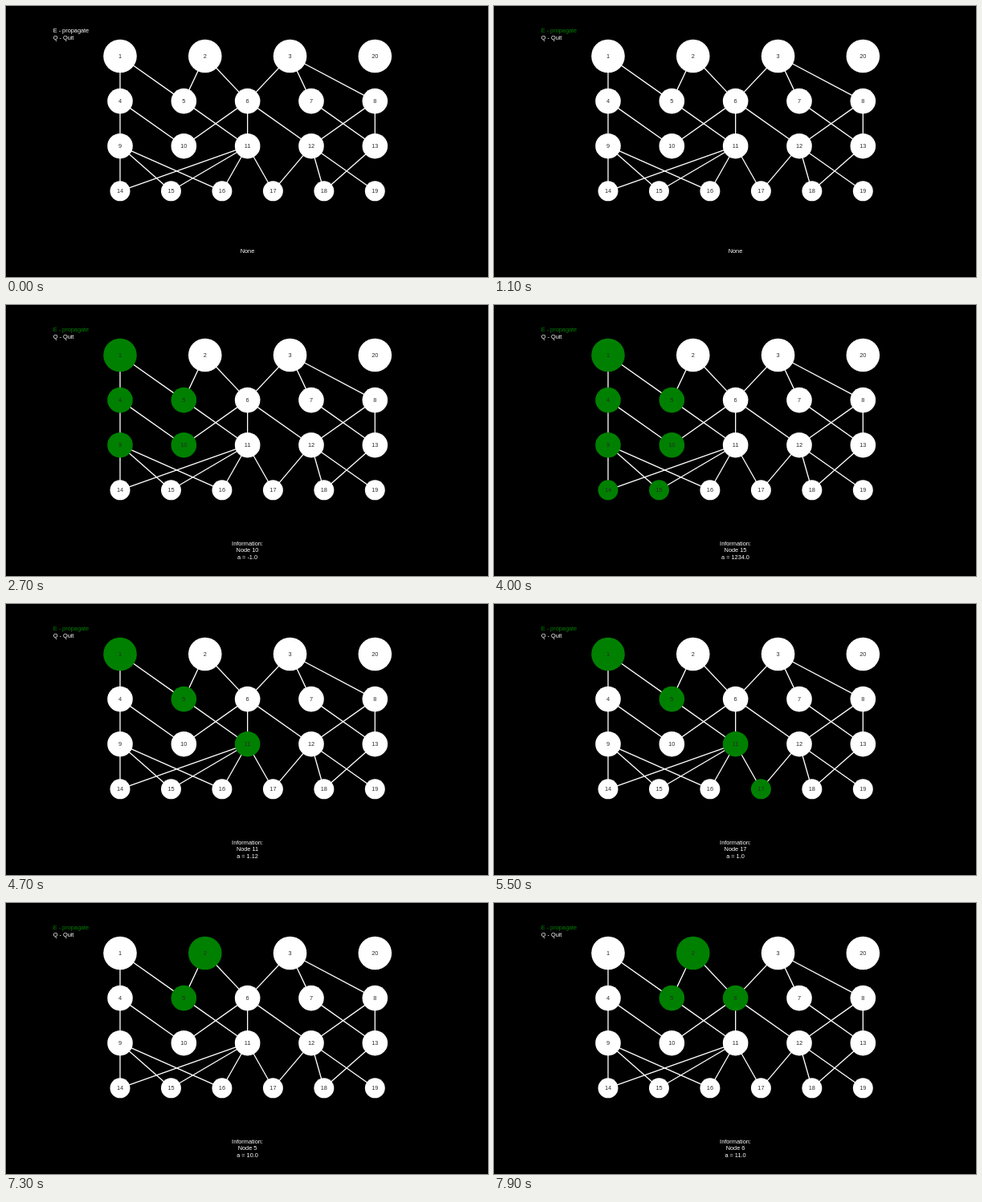
These frames come from a looping animation (600x338 px, 8000 ms). An HTML page with a canvas:

```html
<!DOCTYPE html>
<html lang="en">
<head>
<meta charset="utf-8">
<title>Node propagation</title>
<style>
  html, body { margin: 0; width: 100%; height: 100%; overflow: hidden; background: #000; }
  canvas { display: block; width: 100vw; height: 100vh; }
</style>
</head>
<body>
<canvas id="stage"></canvas>
<script>
const W = 600, H = 338, LOOP = 8000;
const GREEN = '#008000', WHITE = '#fff', INK = '#2a2a2a';
const LEFT = 142, SPAN = 317.3;
const canvas = document.getElementById('stage');
const ctx = canvas.getContext('2d');
const scale = window.devicePixelRatio || 1;
canvas.width = W * scale;
canvas.height = H * scale;

const rows = [
  { ids: [1, 2, 3, 20], y: 62.5, r: 20.8 },
  { ids: [4, 5, 6, 7, 8], y: 118.6, r: 15.8 },
  { ids: [9, 10, 11, 12, 13], y: 174.7, r: 15.8 },
  { ids: [14, 15, 16, 17, 18, 19], y: 230.8, r: 12.5 }
];
const children = {
  1: [4, 5], 2: [5, 6], 3: [6, 7, 8],
  4: [9, 10], 5: [11], 6: [10, 11, 12], 7: [13], 8: [12, 13],
  9: [14, 15, 16], 11: [14, 15, 16, 17], 12: [17, 18, 19], 13: [18]
};
const values = {
  4: '1.0', 5: '10.0', 6: '11.0', 9: '1.0', 10: '-1.0', 11: '1.12',
  14: '100.0', 15: '1234.0', 16: '100.0', 17: '1.0'
};

// Each step lights a node; "keep" first clears all but the listed nodes.
const KEY_TIME = 1000;
const steps = [
  { at: 1200, id: 4, keep: [1] },
  { at: 1700, id: 5 },
  { at: 2200, id: 9 },
  { at: 2700, id: 10 },
  { at: 3200, id: 14 },
  { at: 3700, id: 15 },
  { at: 4200, id: 16 },
  { at: 4700, id: 11, keep: [1, 5] },
  { at: 5300, id: 17 },
  { at: 5800, id: 14 },
  { at: 6300, id: 15 },
  { at: 6700, id: 16 },
  { at: 7300, id: 5, keep: [2] },
  { at: 7800, id: 6 }
];

const nodes = {};
for (const { ids, y, r } of rows) {
  ids.forEach((id, i) => {
    nodes[id] = { x: LEFT + SPAN * i / (ids.length - 1), y, r };
  });
}

function stateAt(t) {
  let lit = new Set(), current = null;
  for (const { at, id, keep } of steps) {
    if (at > t) break;
    if (keep) lit = new Set(keep);
    lit.add(id);
    current = id;
  }
  return { lit, current };
}

function label(text, x, y, color, align = 'center') {
  ctx.fillStyle = color;
  ctx.textAlign = align;
  ctx.fillText(text, x, y);
}

function drawEdges() {
  ctx.strokeStyle = WHITE;
  ctx.lineWidth = 1.3;
  ctx.beginPath();
  for (const id in children) {
    for (const child of children[id]) {
      ctx.moveTo(nodes[id].x, nodes[id].y);
      ctx.lineTo(nodes[child].x, nodes[child].y);
    }
  }
  ctx.stroke();
}

function drawNodes(lit) {
  for (const id in nodes) {
    const { x, y, r } = nodes[id];
    ctx.fillStyle = lit.has(+id) ? GREEN : WHITE;
    ctx.beginPath();
    ctx.arc(x, y, r, 0, Math.PI * 2);
    ctx.fill();
    label(id, x, y + 2.6, INK);
  }
}

function drawInfo(id) {
  const lines = id ? ['Information:', `Node ${id}`, `a = ${values[id]}`] : ['', 'None', ''];
  lines.forEach((line, i) => label(line, 300.5, 299.7 + i * 8.5, WHITE));
}

function draw(t) {
  const { lit, current } = stateAt(t);
  ctx.setTransform(scale, 0, 0, scale, 0, 0);
  ctx.fillStyle = '#000';
  ctx.fillRect(0, 0, W, H);
  ctx.font = '7.35px "Liberation Sans", Arial, sans-serif';
  drawEdges();
  drawNodes(lit);
  label('E - propagate', 58.7, 32.6, t >= KEY_TIME ? GREEN : WHITE, 'left');
  label('Q - Quit', 58.7, 41.9, WHITE, 'left');
  drawInfo(current);
}

const start = performance.now();
function tick() {
  draw((performance.now() - start) % LOOP);
  requestAnimationFrame(tick);
}
tick();
</script>
</body>
</html>
```
